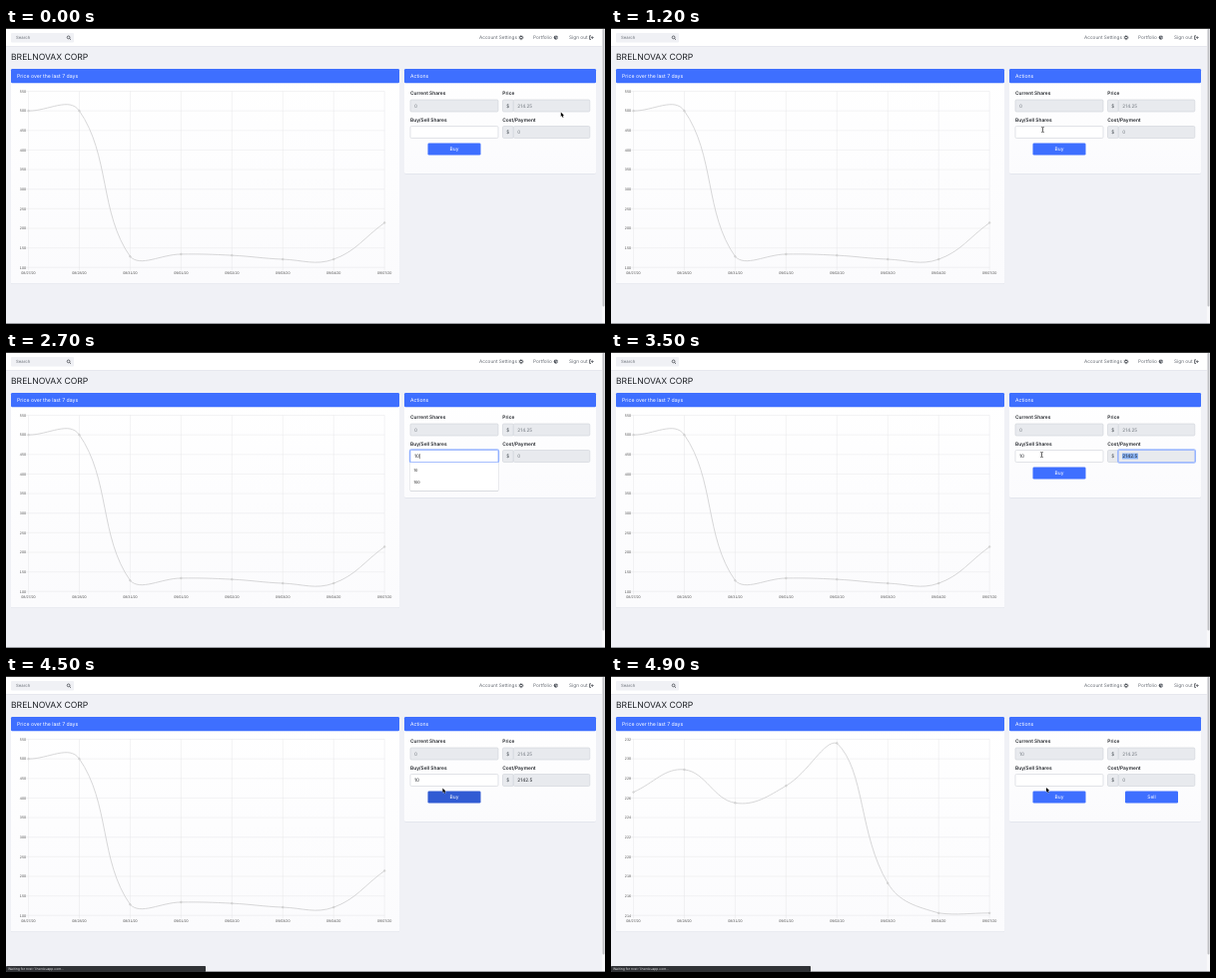
Write an HTML page that moves like this. It is 600 px wide and 297 px high and loops after 5000 ms.

```html
<!DOCTYPE html>
<html lang="en">
<head>
<meta charset="utf-8">
<title>Share trading page</title>
<style>
  html, body { margin: 0; width: 100%; height: 100%; overflow: hidden; background: #f0f1f6; }
  svg { display: block; width: 600px; height: 297px; }
  text { font-family: Inter, "Open Sans", sans-serif; text-rendering: geometricPrecision; white-space: pre; }
  .axis text { font-family: "Liberation Sans", Arial, sans-serif; font-size: 3.7px; fill: #555; }
</style>
</head>
<body>
<svg id="stage" viewBox="0 0 600 297" xmlns="http://www.w3.org/2000/svg"></svg>
<script>
const stage = document.getElementById('stage');
const LOOP = 5000, STEP = 100;
const BLUE = '#3e6fff', PRESSED = '#315bd3', INK = '#22252a', MUTED = '#747a82';
const AREA = { left: 22.5, right: 379.2, top: 63.5, bottom: 240.3 };
const DATES = ['08/27/20', '08/28/20', '08/31/20', '09/01/20', '09/02/20', '09/03/20', '09/04/20', '09/07/20'];
const BEFORE = { min: 100, max: 550, tick: 50, values: [500, 500, 128, 134, 131, 121, 121, 214.25] };
const AFTER = { min: 214, max: 232, tick: 2, values: [226.6, 228.9, 225.5, 227.25, 231.6, 217.3, 214.25, 214.25] };

// Pointer path: step, x, y
const PATH = [
  [0, 555.8, 84.6], [1, 552, 58], [2, 540, 8], [3, 500, 8], [4, 456, 30], [5, 412.5, 68], [6, 422.8, 78],
  [7, 523.5, 78], [8, 300, 60], [9, 10.5, 47.5], [10, 150, 84], [11, 382, 115], [12, 432.5, 102],
  [13, 431.4, 101.2], [14, 430.5, 101], [34, 430.5, 101], [35, 431.5, 103], [36, 433, 106],
  [37, 437, 112], [38, 440, 118], [40, 440, 118], [45, 437.4, 112.6], [48, 436, 112], [50, 436, 112]
];

const rect = (x, y, w, h, fill, extra = '') =>
  `<rect x="${x}" y="${y}" width="${w}" height="${h}" fill="${fill}" ${extra}/>`;
const path = (d, extra) => `<path d="${d}" ${extra}/>`;
const text = (x, y, str, size = 4.75, fill = INK, extra = '') =>
  `<text x="${x}" y="${y}" font-size="${size}" fill="${fill}" ${extra}>${str}</text>`;
const clamp = (v, lo, hi) => Math.min(hi, Math.max(lo, v));

function pointerAt(step) {
  const i = Math.max(1, PATH.findIndex(p => p[0] >= step));
  const [s0, x0, y0] = PATH[i - 1], [s1, x1, y1] = PATH[i];
  const k = (step - s0) / (s1 - s0);
  return [x0 + (x1 - x0) * k, y0 + (y1 - y0) * k];
}

function smoothLine(pts, tension = 0.4) {
  const capY = y => clamp(y, AREA.top, AREA.bottom);
  const handles = pts.map((p, i) => {
    const a = pts[i - 1] || p, b = pts[i + 1] || p;
    const da = Math.hypot(p[0] - a[0], p[1] - a[1]), db = Math.hypot(b[0] - p[0], b[1] - p[1]);
    const ka = tension * da / (da + db), kb = tension * db / (da + db);
    const dx = b[0] - a[0], dy = b[1] - a[1];
    return {
      into: [p[0] - ka * dx, capY(p[1] - ka * dy)],
      out: [p[0] + kb * dx, capY(p[1] + kb * dy)]
    };
  });
  return pts.reduce((d, p, i) => i ? `${d}C${handles[i - 1].out} ${handles[i].into} ${p}` : `M${p}`, '');
}

function chart({ min, max, tick, values }, grow) {
  const { left, right, top, bottom } = AREA;
  const xAt = i => left + (right - left) * i / (values.length - 1);
  const yAt = v => bottom - (bottom - top) * (v - min) / (max - min);
  let grid = '', labels = '';
  for (let v = min; v <= max; v += tick) {
    grid += `M${left - 2.5} ${yAt(v)}H${right}`;
    labels += `<text x="20" y="${yAt(v) + 1.2}" text-anchor="end">${v}</text>`;
  }
  DATES.forEach((date, i) => {
    grid += `M${xAt(i)} ${top}V${bottom + 3}`;
    labels += `<text x="${xAt(i)}" y="247.4" text-anchor="middle">${date}</text>`;
  });
  const pts = values.map((v, i) => [xAt(i), bottom + (yAt(v) - bottom) * grow]);
  const dots = pts.map(([x, y]) =>
    `<circle cx="${x}" cy="${y}" r=".85" fill="#ddd" stroke="#bbb" stroke-width=".4"/>`).join('');
  return `<g class="axis">${path(grid, 'stroke="#e4e4e6" stroke-width=".45"')}${labels}</g>` +
    path(smoothLine(pts), 'fill="none" stroke="#cdcdcf" stroke-width=".8"') + dots;
}

function card(x, w, bottom, title) {
  return rect(x, 41.6, w, bottom - 41, '#d9dce5', 'rx="1.5"') +
    rect(x, 41, w, bottom - 41, 'url(#paper)', 'rx="1.3"') +
    rect(x, 41, w, 14.2, BLUE, 'rx="1.2"') +
    text(x + 6, 50.1, title, 5.15, '#fff');
}

function field(x, y, w, value, { disabled = true, focus = 0, dark = false } = {}) {
  const ring = focus ? rect(x - .6, y - .6, w + 1.2, 13.2, 'none',
    `rx="1.6" stroke="#9dbaff" stroke-width="1.2" opacity="${focus}"`) : '';
  const border = focus ? '#7c9fff' : '#ced2d9';
  return ring + rect(x, y, w, 12, disabled ? '#e8eaee' : '#fff', `rx="1.2" stroke="${border}" stroke-width=".6"`) +
    text(x + 4, y + 7.7, value, 4.75, dark ? INK : MUTED);
}

const dollar = y => rect(497.5, y, 10.8, 12, '#e8eaee', 'rx="1.2" stroke="#ced2d9" stroke-width=".6"') +
  text(502.9, y + 7.7, '$', 4.75, '#495057', 'text-anchor="middle"');

const button = (x, label, fill) => rect(x, 115.5, 53, 12, fill, 'rx="1.3"') +
  text(x + 26.5, 123.3, label, 4.9, '#fff', 'text-anchor="middle"');

function navigation() {
  const link = '#666b73';
  return rect(0, 0, 600, 18, '#fff') + rect(0, 18, 600, .6, '#dfe2e9') + rect(0, 0, 600, .9, '#222') +
    rect(5, 5, 63, 9.5, '#f0f1f5', 'rx="1"') + text(10, 11.3, 'Search', 4.3, '#6b7078') +
    `<g fill="none" stroke="#44484f" stroke-width=".8">
      <circle cx="62.6" cy="9.4" r="1.4"/><path d="M63.7 10.5L65 11.8"/>
      <circle cx="516" cy="9.6" r="1.35" stroke-width="1"/>
      <circle cx="516" cy="9.6" r="2.1" stroke-width=".6" stroke-dasharray=".9 .75"/>
      <path d="M586 7.8H584.6V11.4H586M585.8 9.6H588M587 8.3L588.2 9.6L587 10.9"/></g>
    <circle cx="550.8" cy="9.6" r="2.1" fill="#50555d"/>
    <path d="M550.8 7.2V9.6L552.4 11.4M550.8 9.6H553" stroke="#fff" stroke-width=".45" fill="none"/>` +
    text(474, 11.2, 'Account Settings', 4.7, link) +
    text(528, 11.2, 'Portfolio', 4.75, link) + text(564, 11.2, 'Sign out', 4.8, link);
}

function suggestions(items) {
  const h = 5.2 + items.length * 11.4;
  return rect(404.6, 111.2, 88.8, h + .6, '#cfd2d8', 'rx="1"') +
    rect(405, 111, 88, h, '#fff', 'rx=".8"') +
    items.map((item, i) => text(408.4, 120.4 + i * 11.4, item, 3.8, '#111')).join('');
}

function pointer(step) {
  const [x, y] = pointerAt(step);
  const overInput = x > 405 && x < 493 && y > 98.5 && y < 110.5;
  if (overInput) {
    const beam = `M${x - 1.2} ${y - 2.6}Q${x} ${y - 2.6} ${x} ${y - 1.8}V${y + 1.8}Q${x} ${y + 2.6} ${x + 1.2} ${y + 2.6}` +
      `M${x + 1.2} ${y - 2.6}Q${x} ${y - 2.6} ${x} ${y - 1.8}M${x} ${y + 1.8}Q${x} ${y + 2.6} ${x - 1.2} ${y + 2.6}`;
    return path(beam, 'fill="none" stroke="#222" stroke-width=".7"');
  }
  return path(`M${x} ${y}v4.3l1 -.9l.8 1.8l.9 -.4l-.8 -1.7h1.3z`,
    'fill="#000" stroke="#fff" stroke-width=".5" paint-order="stroke"');
}

function actions(step, reloaded) {
  const typed = reloaded || step < 23 ? '' : step < 27 ? '1' : '10';
  const inputFocus = step < 19 || step >= 31 ? 0 : step === 19 ? .7 : 1;
  const costFocus = step < 31 || step >= 38 ? 0 : step === 31 ? .6 : 1;
  const paid = step >= 31 && !reloaded;
  const pressed = step >= 38 && !reloaded;
  let out = card(399, 192, 146, 'Actions');
  [['Current Shares', 405, 67], ['Price', 497.3, 67], ['Buy/Sell Shares', 405, 94], ['Cost/Payment', 497.3, 94]]
    .forEach(([label, x, y]) => out += text(x, y, label, 4.85, INK, 'font-weight="600"'));
  out += field(405, 72, 88, reloaded ? '10' : '0') + dollar(72) + field(508.3, 72, 76.5, '214.25');
  out += field(405, 98.5, 88, typed, { disabled: false, focus: inputFocus, dark: true }) + dollar(98.5);
  out += field(508.3, 98.5, 76.5, paid ? '' : '0', { focus: costFocus });
  if (paid) {
    if (costFocus) out += rect(512, 101.6, 16, 5.8, '#86b0f2');
    out += text(512.3, 106.2, '2142.5', 4.75, INK);
  }
  if (inputFocus) out += rect(409.1 + typed.length * 2.7, 102, .5, 5.2, '#333');
  out += button(422.5, 'Buy', pressed ? PRESSED : BLUE);
  if (reloaded) out += button(515, 'Sell', BLUE);
  if (step >= 20 && step < 31) {
    const matches = ['10', '100', '1', '15', '5', '20'];
    out += suggestions(matches.slice(0, step < 23 ? 6 : step < 27 ? 4 : 2));
  }
  return out;
}

function draw(step) {
  const reloaded = step >= 47;
  let out = `<defs><linearGradient id="paper" x2="0" y2="1">
    <stop stop-color="#fff"/><stop offset="1" stop-color="#fbfbfd"/></linearGradient></defs>`;
  out += rect(0, 0, 600, 297, '#f0f1f6') + navigation();
  out += text(5, 32, 'BRELNOVAX CORP', 8.6, '#1e2126');
  out += card(5, 389, 256.5, 'Price over the last 7 days');
  if (!reloaded) out += chart(BEFORE, 1);
  else if (step > 47) out += chart(AFTER, step === 48 ? .75 : 1);
  out += actions(step, reloaded);
  if (step !== 47) out += rect(596.8, 1, 3.2, 296, '#f8f8fa') + rect(597.5, 1, 2, 278.5, '#bfc0c4', 'rx="1"');
  out += rect(0, 296.2, 600, .8, '#85878c');
  if (step >= 42) {
    out += rect(0, 291, 200, 6, '#303236', 'rx=".8"') +
      text(2, 295.2, 'Waiting for nvst-1.herokuapp.com...', 3.35, '#dcdde0');
  }
  const typing = step >= 23 && step < 35;
  if (!typing) out += pointer(step);
  stage.innerHTML = out;
}

let shown = -1;
const start = performance.now();
function tick() {
  const step = Math.floor((performance.now() - start) % LOOP / STEP);
  if (step !== shown) draw(shown = step);
  requestAnimationFrame(tick);
}
tick();
</script>
</body>
</html>
```
